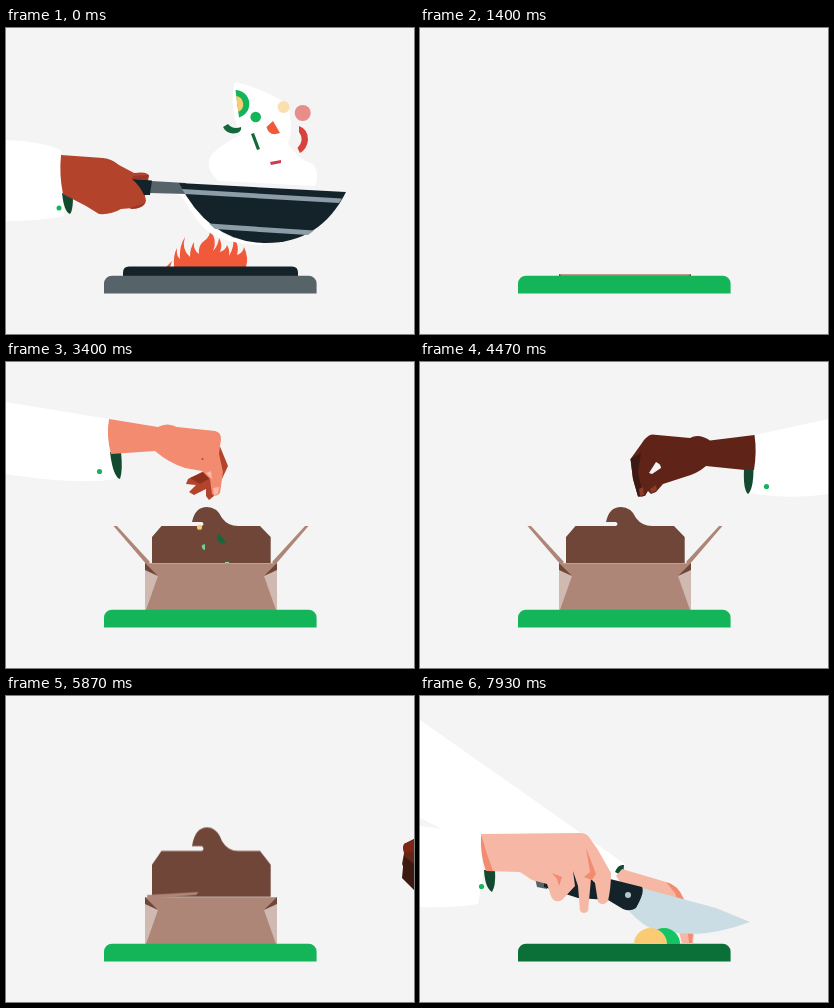
Write an HTML page without scripts that moves like this. It is 408 px wide and 306 px high and loops after 8000 ms.

```html
<!DOCTYPE html>
<html lang="en">
<head>
<meta charset="utf-8">
<title>Cooking loop</title>
<style>
html, body { margin: 0; width: 100%; height: 100%; overflow: hidden; background: #f4f4f4; }
svg { display: block; width: 100vw; height: 100vh; }

:root {
  --ink: #14232a; --steel: #566469; --green: #14b559; --forest: #0b6f38; --cuff: #12492f;
  --card: #ad8677; --cocoa: #6f4638; --rust: #b4432b; --salmon: #f28b70; --pink: #f7b7a5;
}
.ink { fill: var(--ink); } .steel { fill: var(--steel); } .green { fill: var(--green); }
.cuff { fill: var(--cuff); } .card { fill: var(--card); } .cocoa { fill: var(--cocoa); }
.rust { fill: var(--rust); } .salmon { fill: var(--salmon); } .pink { fill: var(--pink); }
.white { fill: #fff; }

/* one clock for the whole story: 1% = 80 ms */
.t { animation: 8s linear infinite; }
.cut { animation-timing-function: step-end; }

/* pan scene */
#pan { animation-name: pan; }
@keyframes pan {
  0%, 1% { transform: none; }
  5% { transform: translate(0, 6px) rotate(1deg); }
  8% { transform: none; animation-timing-function: ease-in; }
  11.4% { transform: translate(-90px, -30px) rotate(-3deg); }
  14.5%, 100% { transform: translate(-380px, -40px) rotate(-3deg); }
}
#toss { animation-name: toss; }
@keyframes toss {
  0%, .6% { transform: none; opacity: 1; animation-timing-function: ease-in; }
  6% { transform: translate(166px, 152px) scale(.35); opacity: 1; }
  6.1%, 100% { transform: translate(166px, 152px) scale(.35); opacity: 0; }
}
.bit { transform-box: fill-box; transform-origin: center; animation-name: tumble; }
@keyframes tumble { 0%, .6% { transform: none; } 6%, 100% { transform: rotate(90deg); } }
#fire { transform-origin: 200px 240px; animation-name: fire; }
@keyframes fire { 0%, 11.5% { transform: none; } 13.5%, 100% { transform: scaleY(0); } }
#flames { transform-origin: 200px 240px; animation: flicker .4s ease-in-out infinite; }
@keyframes flicker {
  0%, 100% { transform: none; }
  30% { transform: scaleY(.84) skewX(4deg); }
  65% { transform: scaleY(1.06) skewX(-4deg); }
}
#burner { animation-name: burner; }
@keyframes burner { 0%, 13.5% { transform: none; } 15%, 100% { transform: translateY(12px); } }
#board { animation-name: board; }
@keyframes board {
  0%, 15% { fill: var(--steel); }
  16%, 84.6% { fill: var(--green); }
  85.8%, 100% { fill: var(--forest); }
}

/* box scene */
#box { animation-name: box; }
@keyframes box {
  0%, 17% { transform: translateY(50px); }
  17.5% { transform: translateY(45px); animation-timing-function: ease-out; }
  21%, 76.6% { transform: none; animation-timing-function: ease-in; }
  79.1%, 100% { transform: translateY(50px); }
}
#lid { transform-origin: 205px 201px; animation-name: lid; }
@keyframes lid {
  0%, 22.5% { transform: scaleY(0); animation-timing-function: ease-out; }
  25% { transform: scaleY(1.24); }
  26.5%, 71% { transform: none; }
  73.2%, 73.6% { transform: scaleY(1.243); animation-timing-function: ease-in; }
  76% { transform: scaleY(.34); }
  78%, 100% { transform: scaleY(0); }
}
.flap { transform-origin: 142px 201px; animation-name: flap; }
@keyframes flap {
  0%, 23.9% { transform: rotate(145deg); opacity: 0; }
  24% { transform: rotate(145deg); opacity: 1; animation-timing-function: ease-out; }
  27%, 69.5% { transform: none; }
  73.3% { transform: rotate(126deg); }
  74.5% { transform: rotate(145deg); opacity: 1; }
  74.6%, 100% { transform: rotate(145deg); opacity: 0; }
}
.flap.early { animation-name: flap-early; }
@keyframes flap-early {
  0%, 23.9% { transform: rotate(145deg); opacity: 0; }
  24% { transform: rotate(145deg); opacity: 1; animation-timing-function: ease-out; }
  27%, 69% { transform: none; }
  72.5% { transform: rotate(145deg); opacity: 1; }
  72.6%, 100% { transform: rotate(145deg); opacity: 0; }
}
#sprinkle { animation-name: sprinkle; }
@keyframes sprinkle {
  0% { opacity: 0; } 34% { opacity: 1; } 44% { opacity: 0; }
  56.5% { opacity: 1; } 61%, 100% { opacity: 0; }
}
#sprinkle > * { animation: fall .5s linear var(--d) infinite; }
@keyframes fall { from { transform: translateY(135px); } to { transform: translateY(205px); } }

#hand1 { animation-name: hand1; }
@keyframes hand1 {
  0%, 30% { transform: translateX(-260px); }
  31% { transform: translateX(-57px); animation-timing-function: ease-out; }
  32.6%, 34% { transform: none; }
  36%, 40% { transform: translate(2px, 4px); }
  38%, 42.3%, 44.5% { transform: none; animation-timing-function: ease-in; }
  49%, 100% { transform: translateX(-260px); }
}
#hand2 { animation-name: hand2; }
@keyframes hand2 {
  0%, 49% { transform: translateX(240px); animation-timing-function: ease-out; }
  53.5%, 56.2% { transform: none; }
  57.5%, 60% { transform: translate(-2px, 4px); }
  58.8%, 61.2% { transform: none; animation-timing-function: ease-in; }
  65% { transform: translate(54px, -42px); }
  68%, 100% { transform: translate(260px, -40px); }
}
#fist { animation-name: fist; }
@keyframes fist {
  0%, 67.5% { transform: translateX(120px); animation-timing-function: ease-out; }
  70.5% { transform: translate(-105px, 10px); }
  71.4% { transform: translate(-115px, 14px); }
  73.3%, 73.5% { transform: none; }
  74.2%, 100% { transform: translateX(120px); }
}

/* chopping scene */
#reach { animation-name: reach; }
@keyframes reach {
  0%, 88.34% { transform: translateX(-120px); opacity: 1; }
  88.35%, 88.9% { transform: none; animation-timing-function: ease-in-out; }
  91.5% { transform: translate(160px, 90px); opacity: 1; }
  91.51%, 100% { transform: translate(160px, 90px); opacity: 0; }
}
.grip { animation-name: grip; }
@keyframes grip { 0% { opacity: 0; } 91.5%, 100% { opacity: 1; } }
#knife { animation-name: knife; }
@keyframes knife {
  0%, 92% { transform: translate(-360px, -60px); animation-timing-function: ease-out; }
  95% { transform: translate(-30px, -20px) rotate(-9deg); }
  96.2% { transform: translate(-8px, 0); }
  97.4%, 98.4% { transform: translate(-8px, -38px); }
  99.05%, 100% { transform: none; }
}
</style>
</head>
<body>
<svg viewBox="0 0 408 306">
  <defs>
    <clipPath id="above"><rect width="408" height="248"/></clipPath>
    <path id="panel" d="M107.500 164H111L144 200L141 203Z"/>
    <g id="corner">
      <path fill="#cfb9b0" d="M139 205L152 214L140 248H139Z"/>
      <path class="cocoa" d="M139 201L152 214L139 208Z"/>
    </g>
  </defs>

  <!-- pan, flames and stove -->
  <g id="fire" class="t">
    <path id="flames" fill="#f0593a" d="M160 239L166 233L164 239H168Q167 227 171 220Q170 228 174 231Q173 218 179 209Q175 221 184 229Q184 220 188 214Q187 222 193 226Q192 217 198 213Q204 209 204 203Q212 212 207 223Q212 218 213 210Q217 216 214 224Q220 222 221 217Q224 222 223 228Q229 218 227 208Q234 218 231 227Q237 225 238 219Q243 230 240 239Z"/>
  </g>
  <g id="toss" class="t">
    <path class="white" d="M229 54Q262 62 282 77Q288 100 282 116Q293 132 307 136Q314 146 309 158L212 153Q197 138 206 126Q216 116 235 107Q222 80 229 54Z"/>
    <g class="bit t">
      <path class="green" d="M229.500 62A14 14 0 0 1 233 89.500Z"/>
      <path fill="#fbcb73" d="M230 68A8.500 8.500 0 0 1 232.500 84Z"/>
    </g>
    <circle class="green" cx="249.700" cy="89" r="5.300"/>
    <circle fill="#fbdfae" cx="277.500" cy="79" r="6"/>
    <circle fill="#e88e8a" cx="296.700" cy="85" r="8"/>
    <path class="bit t" fill="#14673c" d="M217 99L222 96Q227 102 235 99Q236 103 231 105Q221 107 217 99Z"/>
    <path class="bit t" fill="#14673c" d="M245 106L248 105L254 121L251 122Z"/>
    <path class="bit t" fill="#f0593a" d="M260.500 99L267 93L274 105Q263 109 260.500 99Z"/>
    <path class="bit t" fill="#d8413c" d="M293 98Q302 101 302 112Q301 121 294 125L291.500 120Q299 112 293 104Z"/>
    <path class="bit t" fill="#d03a4a" d="M264 134L275 132V135L265 137Z"/>
  </g>
  <g id="pan" class="t">
    <path class="white" d="M163 165Q171 159 179 166L206 198Q222 213 256 214V217Q220 216 201 203Q188 190 178 172Q176 165 163 166Z"/>
    <path class="steel" d="M145 153L180 155L180 166L144 165Z"/>
    <path class="ink" d="M173 155L340 164Q314 216 258 215Q203 214 173 155Z"/>
    <path fill="#8c9da7" d="M176 161L336 170.500L333 175L179 166ZM203 195.500L308 202.500L302 207L209 201Z"/>
    <path class="white" d="M-260 100L0 112Q35 113 55 122L58 188Q35 193 0 193H-260Z"/>
    <path class="cuff" d="M56 165L67 169Q67 183 64 186Q58 184 56 165Z"/>
    <circle class="green" cx="53" cy="180" r="2.500"/>
    <path class="rust" d="M55 127L97 130Q106 131 113 137L128 145Q142 143 143 148L142 153L137 157L140 173Q139 180 127 180L115 181Q105 187 93 186L80 178L57 166Q53 147 55 127Z"/>
    <path class="ink" d="M126 151L146 152.500L144 167H138Q134 158 126 151Z"/>
    <path fill="#9a3826" d="M127 148L143 147L141 152L126 151ZM124 180L139 175Q136 181 125 181Z"/>
  </g>
  <path id="burner" class="ink t" d="M117 249V244.500Q117 238.500 123 238.500H286Q292 238.500 292 244.500V249Z"/>

  <!-- box -->
  <g clip-path="url(#above)">
    <g id="box" class="t">
      <path id="lid" class="cocoa t" d="M146 201V175L155.500 164H196Q199 162 196 160H186Q189 145 201 145Q211 145 216 156Q222 164 232 164H254L264.700 175V201Z"/>
      <g id="sprinkle" class="t cut">
        <circle fill="#fbcb73" cx="193.500" r="2.600" style="--d:-315ms"/>
        <path fill="#6fd49a" d="M199-3V3Q195 2 196-2Z" style="--d:-457ms"/>
        <path fill="#14673c" d="M212-5L215-3L220 3Q214 6 211 0Z" style="--d:-400ms"/>
        <path fill="#8bdcab" d="M219-1h4v3h-4Z" style="--d:-70ms"/>
      </g>
      <g class="flap t"><use href="#panel" class="card"/></g>
      <g transform="matrix(-1 0 0 1 410 0)"><g class="flap early t"><use href="#panel" class="card"/></g></g>
      <path class="card" d="M139 201.300H271V248H139Z"/>
      <use href="#corner"/>
      <use href="#corner" transform="matrix(-1 0 0 1 410 0)"/>
    </g>
  </g>
  <path id="board" class="t" d="M98 265.500V255.700a8 8 0 0 1 8-8H302.600a8 8 0 0 1 8 8V265.500Z"/>

  <g id="hand1" class="t">
    <path class="white" d="M-260 0L0 40L103 57L113 116Q80 124 0 112H-260Z"/>
    <path class="cuff" d="M104 90H115Q117 108 114 117Q107 115 104 90Z"/>
    <circle class="green" cx="93.500" cy="109.500" r="2.600"/>
    <path class="rust" d="M213 82L222 104L215 119L205 111ZM200 108L182 117L180 122L190 123L183 130L188 133L200 127V134L203 138L208 134L206 117Z"/>
    <path fill="#8f301d" d="M184 116L200 109L204 116L194 122Z"/>
    <path class="salmon" d="M103 57L152 65Q161 60 171 65L209 69Q215 70 215 77L213 92L217 110L214 131Q210 136 206 132L204 117L196 109L179 106Q163 101 149 89L105 92Q100 74 103 57Z"/>
    <path fill="#f9b8a4" d="M200 111L205 109L206 117ZM207 126L213 125L212 132L208 133Z"/>
    <circle class="rust" cx="196.500" cy="97" r="1"/>
  </g>

  <g id="hand2" class="t">
    <path class="white" d="M335 73L408 57L680 20V132H408Q370 138 330 131Z"/>
    <path class="cuff" d="M324 106H333.500Q333.500 127 328 132Q323 128 324 106Z"/>
    <circle class="green" cx="346.500" cy="124.500" r="2.600"/>
    <path fill="#602317" fill-rule="evenodd" d="M334.500 73L290 78.500Q279 71 270 76L232 72.500Q226 74 222 81L210.500 97L213 117L218 134.500L225 134L228 129L231 132L236 130L243 122L263 115.500Q277 112 286 104L325 108H334Q337 90 334.500 73ZM229 111L236 100Q241 102 241 106L232 112Z"/>
    <path fill="#3c1a13" d="M210.500 97L221 91L218 110L223 134.500H218L213 117Z"/>
    <path fill="#8d3a29" d="M219 127L223 125L224 133L220 134ZM230 127L236 123L237 128L231 131Z"/>
  </g>

  <g id="fist" class="t">
    <path class="white" d="M475 138L700 120V215L475 200Z"/>
    <path fill="#65261a" d="M478 148L435 150L408 143L398 148Q396 151 398 157L396 168L408 194L430 190L478 188Z"/>
    <path fill="#7d2616" d="M398 148L408 143L422 147L410 156L398 157Z"/>
    <path fill="#3c1a12" d="M398 160L408 168L416 192L408 194L396 182Z"/>
  </g>

  <!-- chopping -->
  <g id="reach" class="t">
    <path class="white" d="M-22 90L-260 0V120L-22 140Z"/>
    <path class="salmon" d="M36 106L52 103L70 98L91 115Q92 121 87 121L66 109L68 134Q66 139 61 136L55 116L50 112L54 142Q53 147 48 144L42 118Z"/>
    <path class="pink" d="M-24 93L0 91L36 86L67 91L89 101Q95 105 92 108L86 109L66 104L44 105L30 116L53 122Q62 124 60 128Q55 132 38 130L17 133H-24Z"/>
    <path fill="#fce0d7" d="M85 103L93 104L92 108L86 108ZM52 123L60 125L58 129L52 129Z"/>
    <path fill="#f9b8a4" d="M84 116L91 118L88 121ZM62 134L67 132L66 137ZM48 141L53 140L52 145Z"/>
  </g>
  <g class="grip t cut">
    <path class="white" d="M0 24L165 140L205 168L196 184L150 190L20 132L0 122Z"/>
    <path class="cuff" d="M195 176Q198 168 204 169L203 180Z"/>
    <path class="pink" d="M202 173L246 186Q258 189 264 203L274 238L273 247H262L256 225L215 206L196 180Z"/>
    <path class="salmon" d="M246 186Q258 189 263 202L273 234L272 247H269L267 230L255 197Z"/>
  </g>
  <g id="knife" class="t">
    <path fill="#cbdde4" d="M222 192L296 212L330 226Q300 237 275 238L238 236Q222 230 207 213Z"/>
    <path class="steel" d="M115 182L128 185L127 193L117 191Z"/>
    <path class="ink" d="M124 180L150 172L190 183L222 191Q225 196 216 212Q210 216 203 213L188 204L158 202L124 191Z"/>
    <circle fill="#b4c6cd" cx="208" cy="199" r="3"/>
    <path class="white" d="M-300 130H0L61 137L63 180L58 208Q30 212 0 211H-300Z"/>
    <path class="cuff" d="M64 174H75Q76 190 72 196Q65 192 64 174Z"/>
    <circle class="green" cx="61.500" cy="190.500" r="2.600"/>
    <path class="pink" d="M61 138L160 137Q166 137 169 141L178 154L191 177Q191 192 188 205Q184 211 178 206L175 187L171 183L168 215Q164 219 160 215L158 190L153 175L155 190L142 204Q134 208 131 200L127 188L112 184L100 176L67 175Z"/>
    <path class="salmon" d="M61 138L67 158L73 175H66Q60 160 61 138ZM166 152L176 178L172 184L164 181L170 176ZM132 177L142 181L139 190L137 183Z"/>
  </g>
  <g class="grip t cut">
    <path fill="#12c463" d="M228 248A16 16 0 0 1 260 248Z"/>
    <path fill="#fbcb73" d="M214 248A16.500 16 0 0 1 247 248Z"/>
  </g>
</svg>
</body>
</html>
```
